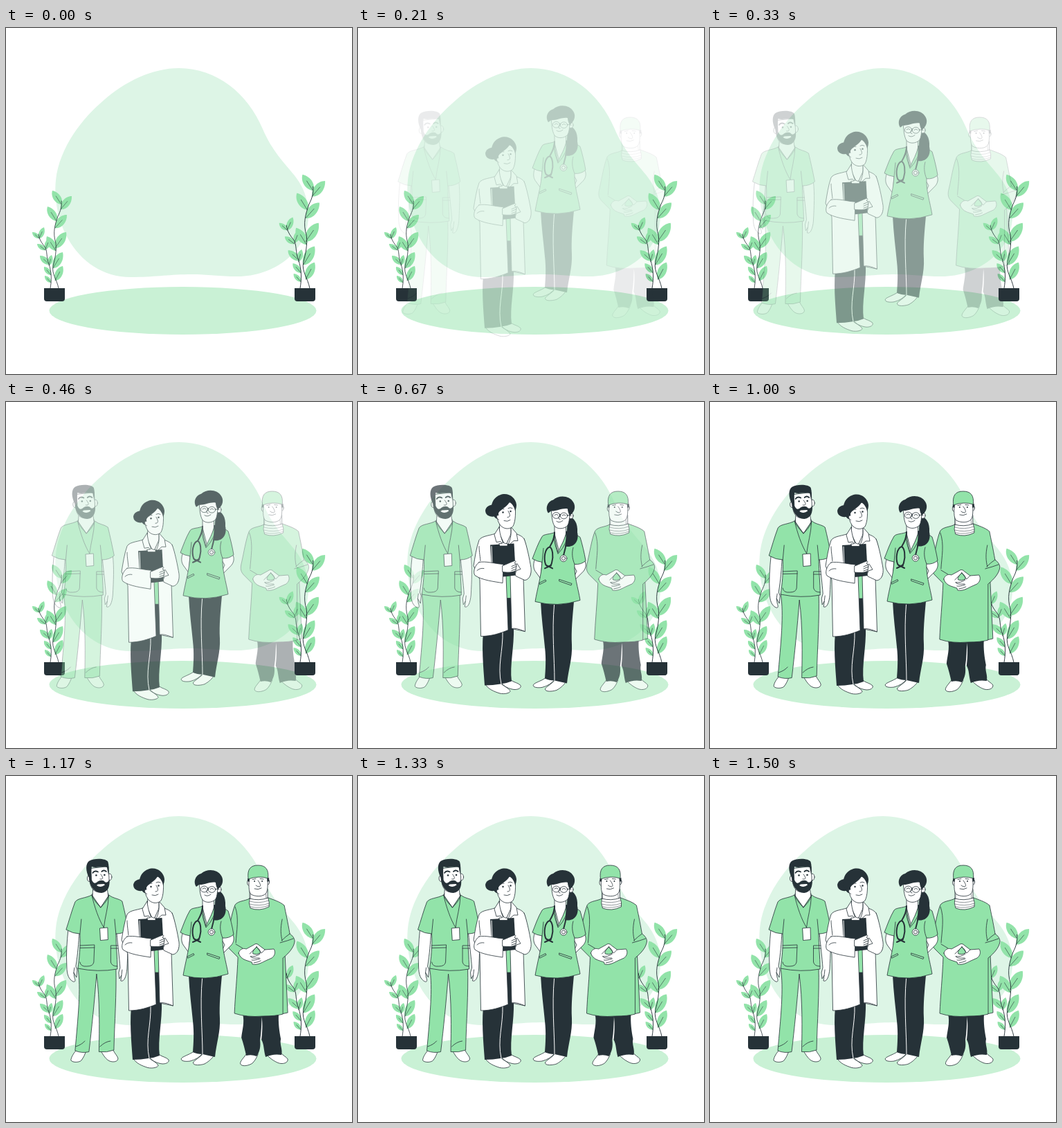
Animation of 500x500 px, one loop 1.54 s. Source, as an HTML page:

```html
<!DOCTYPE html>
<html lang="en">
<head>
<meta charset="utf-8">
<title>Medical team</title>
<style>
html, body { margin: 0; width: 100%; height: 100%; overflow: hidden; background: #fff; }
svg { display: block; width: 100vw; height: 100vh; }
path, circle, ellipse { stroke-linejoin: round; stroke-linecap: round; }
.w, .g, .l { stroke: #263238; stroke-width: .8; }
.w { fill: #fff; }
.g { fill: #92e3a9; }
.l { fill: none; }
.d { fill: #263238; }
.fine { fill: none; stroke: #263238; stroke-width: .5; }
.leaf { fill: #92e3a9; }
.seam { fill: none; stroke: #fff; stroke-width: 1; }
.tube { fill: none; stroke: #263238; stroke-width: 2; }
.brow { fill: none; stroke: #263238; stroke-width: 1.8; }
</style>
</head>
<body>
<svg viewBox="0 0 500 500">
  <path fill="#ddf5e6" d="M250 58C304 58 349 94 371 146C384 177 403 196 416 212C432 232 437 250 437 272C436 325 385 359 335 359C305 359 290 355.5 263 356C232 356.5 215 360 180 360C140 360 108 337 90 305C76 281 69 248 72 220C77 172 112 129 140 105.500C172 77 212 58 250 58Z"/>
  <ellipse cx="255.5" cy="408.5" rx="193" ry="34.5" fill="#c9f1d5"/>
  <g id="plants"></g>

  <g id="bearded"><g transform="translate(1 0)">
    <path class="w" d="M87 222C85 240 84 258 85 275C85 287 88 294 94 297C97 298 98 296 96 291L95 284L99 291L100 280L98 275C101 256 102 242 103 226ZM95 284L96 277"/>
    <path class="w" d="M157 226C159 248 161 262 162 277L160 284L161 293L164 288L163 296C168 298 171 289 172 279C173 258 174 240 172 222ZM164 288L165 280"/>
    <path class="w" d="M98 397C94 402 91 407 91 411C94 414.500 103 414 106 411C109 407 111 403 113 397Z"/>
    <path class="w" d="M134 397C138 404 142 410 147 412C152 414 159 413 159 408C158 404 154 401 152 396Z"/>
    <path class="g" d="M101 278C106 306 101 350 97 397Q107 401 117 398.500C121 365 125 325 128 286C133 325 132 365 131.500 398.500Q143 400 153 396C154 355 157 315 156 278Z"/>
    <path class="l" d="M98 391Q107 388 111 383M133 391Q140 384 148 383"/>
    <path class="w" d="M123 160L122 174L134 190L145 174L143 160Z"/>
    <path class="g" d="M121 172C112 177 101 176 97 182C92 195 88 210 84 222Q94 228 104 228C105 246 103 264 101 278Q130 284 158 279C158 260 156 245 156 228Q167 228 174 222C171 207 168 193 165 181C160 177 152 177 146 172L134 190Z"/>
    <path class="l" d="M104 228L106 207M156 228L154 207M122 170Q119 175 134 190Q148 176 145 170"/>
    <path class="l" d="M104 245L125 244L124 269Q123 275 114 275Q105 276 104 269M104 248.500L125 248M159 245H148.500V269Q150 275 158 275M148.500 249H159"/>
    <path class="l" d="M121 172C125 189 131 207 138.500 219C140 204 145 190 145.500 173"/>
    <path class="w" d="M133 220L144 219L144.500 236.500L134 237.500Z"/>
    <ellipse class="w" cx="118" cy="148" rx="3.500" ry="4.500"/>
    <ellipse class="w" cx="147" cy="146" rx="3" ry="4.800"/>
    <path class="w" d="M118 134V150C119 162 124 168 133 168C143 168 147 159 146 146L145 131Z"/>
    <path class="d" d="M117 147C112 137 112 127 117 123C125 118 142 119 144.500 124C146 129 146 136 145 142L143 132C136 129 128 134 121 131C120 137 121 144 121 150C123 155 126 156 129 153C133 150 138 150 140 153C143 155 146 152 146.500 149C147.500 159 145 168 135 169C123 168 118 158 117 147Z"/>
    <path d="M128 158Q134 162 140 157.500L139 156L130 156.500Z" fill="#fff"/>
    <path class="l" d="M134 142C138 147 138 149.500 133 149"/>
    <path class="brow" d="M122.500 140Q125 136 130 138.500M135.500 138Q138.500 135 142 138"/>
    <circle class="d" cx="127.500" cy="143.500" r="1.300"/><circle class="d" cx="139.500" cy="143" r="1.300"/>
  </g></g>

  <g id="surgeon">
    <path class="w" d="M349 402C345 408 340 412 340.500 416C343 421 354 418 358 415C362 411 364 407 366 402Z"/>
    <path class="w" d="M378 402C383 408 389 412 395 414.500C401 417 410 415 409 409C406 405 402 404 400 401Z"/>
    <path class="d" d="M344 344C347 356 343 368 342 378C345 387 347 395 349 404Q357 402 364 405C369 398 370 390 369 382C371 370 371 358 371.500 348C373 360 372 373 371 381C375 388 374 396 377 406Q388 401 400 403C402 395 397 388 399 380C397 370 395 356 396 344Z"/>
    <path class="g" d="M400 255L405 258L409 342L400 344Z"/>
    <path class="g" d="M354 177C347 181 338 180 333 186C328 198 325 218 322 231C319 242 321 246 326 251L337 262C336 290 333 318 332 343Q350 349 373 347Q392 347 402 344L402 263C412 255 418 247 419 239C419 234 415 230 412 228C409 211 406 197 404 187C397 181 388 179 381 176Z"/>
    <path class="l" d="M333 189C339 205 335 224 334 241M344 249L334 243M401 207C398 221 399 230 401 238M400 238Q406 232 412 228M398 241Q409 238 417 235"/>
    <path class="w" d="M354 166L354 178Q366 190 380 178V164Z"/>
    <path class="w" d="M354 177Q367 181 380.500 176Q383 183 382 189Q368 196 355 191Q352 184 354 177Z"/>
    <path class="fine" d="M354 181Q368 185 381 180M354 185Q368 189 382 184M355 189Q369 192 382 187M355 165V177M377 167L378 177"/>
    <path class="w" d="M338 256C339 251 344 248 349 250L360 244Q364 240.500 368 245L376 251L389 250C392 255 390 260 386 263L377 267C371 270 365 273.500 358 272L357 269L348 266Q340 263 338 256Z"/>
    <path class="g" d="M364 247C368 250 370 253 369 256Q364 259 359 257C357 254 361 250 364 247Z"/>
    <path class="l" d="M369 257Q362 262 355 260.500Q356 264 368 263M369 264Q360 267 357 266M360 270Q367 269 370 267M364 247L354 257M364 247L371 256L376 251"/>
    <ellipse class="w" cx="352.500" cy="154" rx="2" ry="4"/>
    <ellipse class="w" cx="380.500" cy="153" rx="2" ry="4"/>
    <path class="w" d="M353 145C353 158 352 167 356 171C361 174 371 175 376 171C381 168 380 156 380 145Z"/>
    <path class="d" d="M351 148L354 149L353.500 153L351 152ZM379 148L382 147V152L379.500 153Z"/>
    <path class="g" d="M352 149C350 135 355 129 366 129C377 129 382 135 380.500 148Q367 143.500 352 149Z"/>
    <path class="l" d="M366 151C369 155 371 159 368 160Q365 160 363 158M361 163Q366 165 371 162M358 149.500L363 148.500M369 148.500L374 149"/>
    <circle class="d" cx="361" cy="152" r="1"/><circle class="d" cx="372" cy="152" r="1"/>
  </g>

  <g id="nurse">
    <path class="w" d="M256 225C253 233 253 239 256 244L264 255L266 229Z"/>
    <path class="w" d="M312 230L327 228C331 234 329 241 325 245L313 257C311 253 314 249 316 244L312 237Z"/>
    <path class="w" d="M270 399C264 403 256 405 253.500 408C252 412 259 413 266 412C274 410 280 406 284 401Z"/>
    <path class="w" d="M285 401C280 407 272 411 270.500 414C270 419 281 418 287 416C294 412 298 408 301 403Z"/>
    <path class="d" d="M264 288C265 311 268 333 270 354C272 371 271 386 270 399Q276 402 284 402Q293 404 302 406C304 386 310 370 309 350C308 330 310 310 312 288Z"/>
    <path class="seam" d="M283.500 293C280 332 284 370 284 402"/>
    <path class="w" d="M284 175L284 190L291 217L301 190L300 175Z"/>
    <path class="g" d="M284 188C278 191 269 190 266 194C260 204 256 216 252 226Q258 230 266 231C265 250 259 270 256 288Q288 297 321 286C318 268 312 250 313 234Q322 235 329 229C327 217 324 205 321 195C315 190 307 191 301 187C299 199 293 207 289 217C287 208 284 199 284 188Z"/>
    <path class="l" d="M266 231L268 211M313 234C309 225 309 216 311 210M284 190Q280 193 289 219Q304 203 302 188"/>
    <path class="l" d="M262 261L271 256.500L272 258.500L263 263ZM291 256L309 262L308 264.500L291 258.500Z"/>
    <path class="tube" d="M284 188C284 197 280 204 277 209C270 211 268 225 271 234C273 238 279 238 280 232C283 222 281 211 277 209M273 236L281 240M279 236L270 240M301 187C303 200 300 211 297 221"/>
    <circle class="w" cx="297" cy="225.500" r="4.800"/><circle class="l" cx="297" cy="225.500" r="2.600"/>
    <path class="d" d="M304 165C312 166 318 174 317 188C320 201 312 211 299 208C303 199 301 184 303 173Z"/>
    <ellipse class="w" cx="307.500" cy="164" rx="3.500" ry="4.200"/>
    <path class="w" d="M279 153C280 163 280 172 284 179C289 184 297 183 302 179C306 175 306 162 306 151Z"/>
    <path class="d" d="M275 160C270 153 274 143 282 141C291 133 306 135 311 144C315 150 313 157 309 161L306 164C304 160 303 157 303 154C297 152 285 158 279 157Z"/>
    <ellipse class="l" cx="286.500" cy="163.500" rx="5.200" ry="4.400"/>
    <ellipse class="l" cx="297.500" cy="164" rx="5.200" ry="4.400"/>
    <path class="l" d="M291 162H293M302 163L308 164M284 163Q287 160.500 289 163M295 163.500Q298 161 300 163.500M291 164Q288 169 292 169M287 172Q291 175 296 171"/>
  </g>

  <g id="doctor">
    <path class="w" d="M184 408C187 415 197 419 205 421.500C212 423 220 421 220 418C217 413 210 411 206 407Z"/>
    <path class="w" d="M206 405C211 412 218 415 226 416C233 416 236 413 235 410C231 406 226 406 222 403Z"/>
    <path class="d" d="M182 325C178 352 181 382 183 410Q195 410 206 408Q215 407 222 404C219 380 226 355 225 325L222 250H213Z"/>
    <path class="seam" d="M209 331C210 360 201 381 207 408"/>
    <path class="g" d="M213 250H222L221 284H214Z"/>
    <path class="w" d="M205 175L204 190L213 209L221 193V175Z"/>
    <path class="w" d="M202 189C193 194 179 193 175 200C171 211 169 225 167 237L176 257L177.500 339C192 339 205 335 217 330L214 252L220 251L222 328L241.500 332L239 255C248 257 251 250 249 240C246 225 244 210 240 198C236 193 229 191 222 189L213 209Z"/>
    <path class="l" d="M177 230C176 221 175 214 175 209M239 212C237 222 239 230 238 238M222 328Q228 326 241 332"/>
    <path class="w" d="M204 181L197 192L200 203L206 202L213 211C209 203 205 194 204 181ZM221 181L229 190L231 201L225 201L214 211C220 202 222 194 221 181Z"/>
    <path class="d" d="M191 207L225.500 205L228 251L210 253L193 237Z"/>
    <path class="seam" d="M193 209L194 235"/>
    <path class="w" d="M204 205H207Q210 202 213 205H216V208.500H205Z"/>
    <path class="w" d="M175 232C168 237 166 247 169 251C179 258 197 260 209 262L210 235C197 234 185 230 175 232Z"/>
    <path class="l" d="M172 244Q176 240 182 241"/>
    <path class="w" d="M209 237C215 235 220 232 226 230C229 230 228 232 226 233L229 235L228 244C224 247 216 247 209 246Z"/>
    <path class="l" d="M229 235L222 238M229 238L222 241M228 242L222 244"/>
    <path class="w" d="M240 198C244 208 248 228 250 240C251 249 248 257 241 258L228 252Q226 249 229 244L235 242L230 234"/>
    <path class="d" d="M202 151C193 146 185 151 184 157C184 165 192 168 201 165Z"/>
    <path class="w" d="M199 148C199 162 201 174 207 180C213 185 220 184 224 180C228 172 228 160 227 145Z"/>
    <path class="d" d="M196 165C189 153 194 139 205 135C216 130 228 138 229 149C229 153 228 156 227 158C226 152 223 148 219 145C215 153 206 155 203 161L203 169C200 170 198 168 196 165Z"/>
    <path class="w" d="M203 164C199.500 163 199.500 169 203.500 170.500"/>
    <path class="l" d="M217 158C220 163 221 167 216 167M211 172Q216 174 220 171M206 157Q208 154 211 155M217 154Q220 152 223 154"/>
    <circle class="d" cx="209.500" cy="160" r="1.200"/><circle class="d" cx="220.500" cy="158.500" r="1.200"/>
  </g>
</svg>
<script>
const FPS = 24, LOOP = 1540;
const byId = id => document.getElementById(id);

// base x, base y, tip x, tip y
const leaves = [
  [80, 255, 67, 235], [79, 262, 95, 243], [73, 279, 60, 258], [71, 289, 88, 270],
  [72, 322, 59, 301], [71, 318, 87, 295], [68, 347, 82, 324], [71, 365, 82, 344],
  [48, 304, 38, 295], [48, 304, 55, 288], [57, 321, 45, 312], [57, 320, 63, 304],
  [63, 342, 49, 329], [62, 343, 66, 328], [65, 357, 55, 345], [65, 368, 56, 358]
];

function leaf([bx, by, tx, ty]) {
  const dx = tx - bx, dy = ty - by;
  const at = (a, b) => `${(bx + dx * a - dy * b).toFixed(1)} ${(by + dy * a + dx * b).toFixed(1)}`;
  return `<path class="leaf" d="M${at(0, 0)}C${at(.15, .27)} ${at(.65, .33)} ${at(1, 0)}C${at(.75, -.3)} ${at(.25, -.3)} ${at(0, 0)}Z"/>` +
    `<path class="fine" d="M${at(0, 0)}L${at(.6, 0)}"/>`;
}

const plant = leaves.map(leaf).join('') +
  '<path class="l" d="M76 376C73 362 66 356 68 344C71 333 73 323 72 311C67 295 71 284 75 272C79 264 81 258 80 250"/>' +
  '<path class="l" d="M64 376C66 365 66 353 62 341C58 332 60 321 56 316C52 311 48 306 47 298"/>';
const pot = '<path class="d" d="M55 376H85V391Q85 395 81 395H59Q55 395 55 391Z"/>';
byId('plants').innerHTML = plant + pot +
  `<g transform="translate(432 376) scale(1.165) translate(-70 -376)">${plant}</g>` +
  `<g transform="translate(362 0)">${pot}</g>`;

// Ease with a small overshoot: cubic-bezier(.36, -.01, .5, 1.38)
function ease(x) {
  if (x >= 1) return 1;
  const curve = (a, b, s) => 3 * a * s * (1 - s) ** 2 + 3 * b * s * s * (1 - s) + s ** 3;
  let lo = 0, hi = 1;
  for (let i = 0; i < 24; i++) {
    const mid = (lo + hi) / 2;
    if (curve(.36, .5, mid) < x) lo = mid; else hi = mid;
  }
  return curve(-.01, 1.38, lo);
}

// start offset x, y and length in frames
const cast = [
  ['bearded', -30, 0, 36],
  ['surgeon', 30, 0, 36],
  ['nurse', 0, -30, 24],
  ['doctor', 0, 30, 24]
].map(([id, dx, dy, len]) => ({ el: byId(id), dx, dy, len }));

function draw(ms) {
  const step = Math.floor((ms % LOOP + 4) * FPS / 1000) % 37;
  for (const { el, dx, dy, len } of cast) {
    const p = ease((step + .75) / len), rest = 1 - p;
    el.setAttribute('transform', `translate(${(dx * rest).toFixed(2)} ${(dy * rest).toFixed(2)})`);
    el.setAttribute('opacity', step < 3 ? 0 : Math.max(0, Math.min(1, p)).toFixed(3));
  }
}

const start = performance.now();
function tick() {
  draw(performance.now() - start);
  requestAnimationFrame(tick);
}
tick();
</script>
</body>
</html>
```
